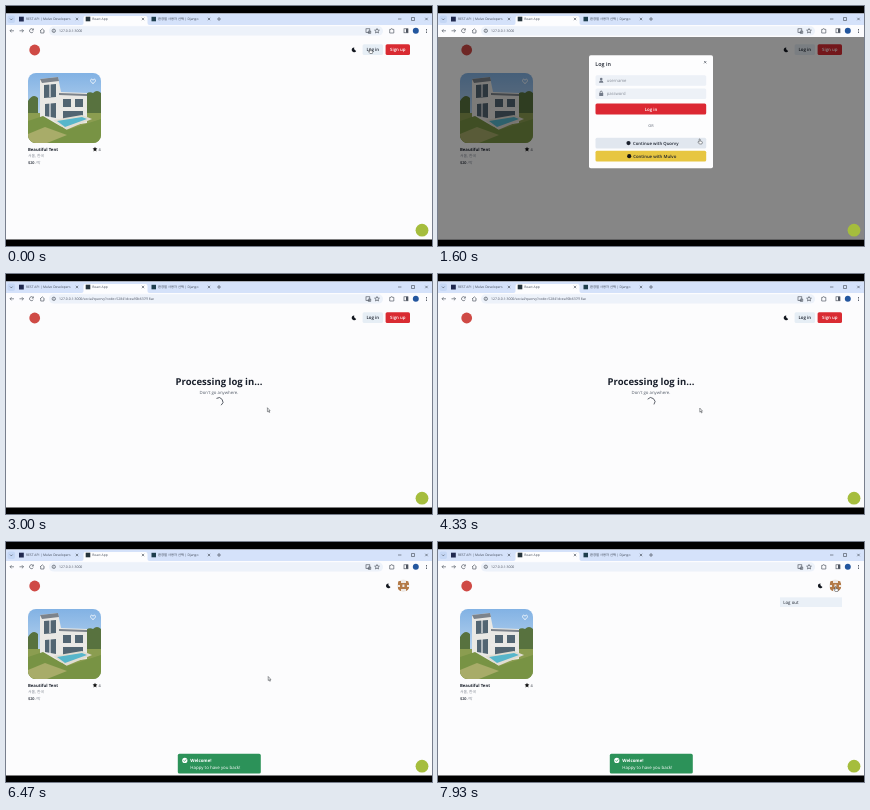
Write an HTML page that moves like this. It is 426 by 240 pixels and loops after 8000 ms.

```html
<!DOCTYPE html>
<html lang="en">
<head>
<meta charset="utf-8">
<title>Log in flow</title>
<style>
html, body { margin: 0; width: 100%; height: 100%; overflow: hidden; background: #000; }
svg { display: block; width: 100vw; height: 100vh; }
text { font: 4.4px "Open Sans", "Noto Sans CJK KR", "Noto Sans CJK", sans-serif; fill: #1a202c; text-rendering: geometricPrecision; }
.bold { font-weight: 700; }
.semi { font-weight: 600; }
.mid { text-anchor: middle; }
.white { fill: #fff; }
.soft { fill: #858b96; }
.small { font-size: 3.8px; }
.tab { font-size: 3.3px; fill: #424a58; }
.line { fill: none; stroke: #4b525e; stroke-width: .65; }
</style>
</head>
<body>
<svg viewBox="0 0 426 240" preserveAspectRatio="none">
  <defs>
    <clipPath id="photoClip"><rect x="22" y="67" width="73" height="70" rx="8"/></clipPath>
    <clipPath id="avatarClip"><circle cx="397.3" cy="43.7" r="6.2"/></clipPath>
    <clipPath id="pageClip"><rect y="31" width="426" height="202.5"/></clipPath>
    <linearGradient id="sky" x2="0" y2="1"><stop stop-color="#82b2e4"/><stop offset="1" stop-color="#dce9f4"/></linearGradient>
    <path id="close" class="line" d="M-1.2-1.2 1.2 1.2M1.2-1.2-1.2 1.2"/>
    <path id="moon" d="M.3-2.3A2.4 2.4 0 1 0 2.2 1.2 2.5 2.5 0 0 1 .3-2.3Z" fill="#141820"/>
  </defs>

  <!-- Browser window -->
  <rect y="7.5" width="426" height="226" fill="#fcfcfd"/>
  <rect y="7.5" width="426" height="11.5" fill="#d5e2fa"/>
  <rect x="1.5" y="9.5" width="7.5" height="7.5" rx="2" fill="#c5d7f5"/>
  <path class="line" d="m4 12.6 1.3 1.3 1.3-1.3"/>
  <rect x="13" y="10.7" width="4.8" height="4.8" fill="#20294f"/>
  <text class="tab" x="20" y="14.4">REST API | Mulvo Developers</text>
  <use href="#close" x="71" y="13"/>
  <path d="M75.5 19q2 0 2-2v-5q0-2 2-2h60q2 0 2 2v5q0 2 2 2Z" fill="#fdfdfe"/>
  <rect x="79.7" y="10.7" width="4.6" height="4.6" fill="#25333b"/>
  <text class="tab" x="86.3" y="14.4">React App</text>
  <use href="#close" x="137" y="13"/>
  <rect x="145.5" y="10.8" width="4.5" height="4.5" fill="#1d3d4c"/>
  <text class="tab" x="152" y="14.4">환경별 사용자 선택 | Django</text>
  <use href="#close" x="203" y="13"/>
  <path class="line" d="M211 13h4m-2-2v4M392 13h3.4M405.5 11.5h3v3h-3z"/>
  <use href="#close" x="420.5" y="13"/>
  <rect y="19" width="426" height="12" fill="#fcfcfe"/>
  <rect x="43" y="20.3" width="334" height="9.2" rx="4.6" fill="#edf2fa"/>
  <path class="line" d="M8 24.8H4m1.6-1.6L4 24.8l1.6 1.6M13.5 24.8h4m-1.6-1.6 1.6 1.6-1.6 1.6M27 23.4a2 2 0 1 0 .3 2.2M27.4 22.5v1.6h-1.6M34 25l2.3-2.2 2.3 2.2m-3.9-.5v2.5h3.2v-2.5"/>
  <g class="line">
    <circle cx="47.8" cy="24.8" r="1.7"/><path d="M47.8 24.5v1.2M47.8 23.4v.5"/>
    <rect x="360" y="22.8" width="3.8" height="3.8"/><path d="M362.3 25h2.4v2.4h-2.4z"/>
    <path d="m371 22.5.7 1.5 1.7.2-1.3 1.1.4 1.7-1.5-.9-1.5.9.4-1.7-1.3-1.1 1.7-.2z"/>
    <path d="M383.7 23.4h1.2a.8.8 0 0 1 1.6 0h1.3v3.6h-4.1z"/>
    <rect x="398" y="22.8" width="4" height="4"/>
  </g>
  <path d="M400 22.8h2v4h-2z" fill="#4b525e"/>
  <circle cx="409.8" cy="24.8" r="3" fill="#23569e"/>
  <path d="M420 23h.9v.9h-.9zM420 24.5h.9v.9h-.9zM420 26h.9v.9h-.9z" fill="#4b525e"/>
  <text id="url" x="53" y="26.1" style="font-size:3.45px;fill:#4a5160"></text>

  <!-- Page -->
  <circle cx="28.7" cy="44" r="5.4" fill="#cf4a45"/>
  <g id="guest">
    <use href="#moon" x="348" y="43.7"/>
    <rect x="356.6" y="38.2" width="20.4" height="10.8" rx="1.6" fill="#e6eef5"/>
    <text class="semi mid" x="366.8" y="45.3">Log in</text>
    <rect x="379.6" y="38.2" width="24.4" height="10.8" rx="1.6" fill="#d92b32"/>
    <text class="semi mid white" x="391.8" y="45.3">Sign up</text>
  </g>
  <g id="member">
    <use href="#moon" x="382.3" y="43.7"/>
    <g clip-path="url(#avatarClip)">
      <rect x="391" y="37" width="13" height="14" fill="#eee9e5"/>
      <path d="M392 39h3v2h5v-2h3v4h-2v2h2v4h-3v-2h-5v2h-3v-4h2v-2h-2zM396.4 42.5v2.4h2v-2.4z" fill="#b37a48" fill-rule="evenodd"/>
    </g>
  </g>

  <g id="home">
    <g clip-path="url(#photoClip)">
      <rect x="22" y="67" width="73" height="70" fill="url(#sky)"/>
      <path d="M22 95q5-8 10-3v20H22zM76 92q6-8 11-5 4-4 8 0v25H76z" fill="#58723f"/>
      <path d="M22 107h73v30H22z" fill="#8b9d50"/>
      <path d="m34 73 18-2 3 15 26 1v30l-27 4-20-9z" fill="#e9e8e4"/>
      <path d="m34 73 18-2 1 4-17 2zM53 87l28 1v2l-28-1z" fill="#7c838b"/>
      <path d="m38 79 12-1v13l-12 1zM39 98l11-1v15l-11-2zM57 93h8v8h-8zM69 93h8v8h-8zM57 105h20v10l-20 2z" fill="#526572"/>
      <path d="M44 78v13M44 97v14M53 103h28" stroke="#eee" stroke-width="1.2"/>
      <path d="m47 114 29-5 10 4-26 11z" fill="#e1ddd2"/>
      <path d="m51 115 25-4 5 2-22 8z" fill="#57b6cb"/>
      <path d="m22 115 15-5 24 14 34-11v24H22z" fill="#789344"/>
      <path d="m22 128 17-7 22 8-20 8H22z" fill="#a8ac69"/>
    </g>
    <path d="M87 77.6c-5-3.4-1-6 0-3.3 1-2.7 5-.1 0 3.3Z" fill="none" stroke="#fff" stroke-width=".8"/>
    <text class="bold" x="22" y="145" style="font-size:4.25px">Beautiful Tent</text>
    <path d="m89 140.8.7 1.5 1.7.2-1.3 1.2.4 1.7-1.5-.9-1.5.9.4-1.7-1.3-1.2 1.7-.2z" fill="#111"/>
    <text class="small" x="92.6" y="144.8">4</text>
    <text class="small soft" x="22" y="151.3">서울, 한국</text>
    <text class="small" x="22" y="158"><tspan class="semi">$20</tspan> <tspan class="soft">/박</tspan></text>
  </g>

  <g id="processing">
    <text class="bold mid" x="213" y="110.8" style="font-size:9.5px">Processing log in...</text>
    <text class="mid" x="213" y="119.8" style="fill:#535b68;font-size:4.3px">Don't go anywhere.</text>
    <path id="spinner" d="M-2.9-2.9A4.1 4.1 0 0 1 2.9 2.9" fill="none" stroke="#303640" stroke-width=".75"/>
  </g>

  <rect id="overlay" y="31" width="426" height="202.5" fill="#000"/>
  <g id="modal">
    <rect x="151" y="49.3" width="124" height="113" rx="1.8" fill="#fdfdfe"/>
    <text class="semi" x="157.3" y="60" style="font-size:5.4px">Log in</text>
    <use href="#close" x="267.2" y="56.2"/>
    <g fill="#edf1f7">
      <rect x="157.5" y="69.2" width="110.7" height="10.6" rx="1.5"/>
      <rect x="157.5" y="82.4" width="110.7" height="10.6" rx="1.5"/>
      <rect id="provider" x="157.5" y="131.8" width="110.7" height="10.6" rx="1.5"/>
    </g>
    <path d="M161 76.8q0-2.5 2.2-2.5t2.2 2.5zM161.2 86.9h4v3.2h-4z" fill="#737b89"/>
    <circle cx="163.2" cy="73" r="1.3" fill="#737b89"/>
    <path class="line" d="M162.1 87v-.8a1.1 1.1 0 0 1 2.2 0v.8"/>
    <text class="soft" x="168.7" y="76" style="font-size:4.2px">username</text>
    <text class="soft" x="168.7" y="89.2" style="font-size:4.2px">password</text>
    <rect x="157.5" y="97.5" width="110.7" height="11" rx="1.5" fill="#dc2833"/>
    <text class="semi mid white" x="213" y="104.7">Log in</text>
    <text class="semi mid soft small" x="213" y="121.4">OR</text>
    <circle cx="190.5" cy="137.1" r="2.1" fill="#1a202c"/>
    <text class="semi" x="195" y="138.8" style="font-size:4.3px">Continue with Quorvy</text>
    <rect x="157.5" y="144.8" width="110.7" height="10.8" rx="1.5" fill="#e7c641"/>
    <circle cx="191.2" cy="150.2" r="2.1" fill="#141414"/>
    <text class="semi" x="195.2" y="152" style="font-size:4.3px">Continue with Mulvo</text>
  </g>

  <g id="menu">
    <rect x="342" y="55.4" width="62" height="9.6" fill="#eaf0f7"/>
    <text x="345.2" y="61.8">Log out</text>
  </g>
  <g clip-path="url(#pageClip)">
    <g id="toast">
      <rect x="171.8" y="211.8" width="83" height="19.8" rx="1.6" fill="#2c9259"/>
      <circle cx="178.8" cy="218.4" r="2.6" fill="#fff"/>
      <path d="m177.5 218.4 1 1 1.7-2" fill="none" stroke="#2c9259" stroke-width=".8"/>
      <text class="bold white" x="184.3" y="220">Welcome!</text>
      <text class="white" x="184.3" y="226.9">Happy to have you back!</text>
    </g>
  </g>
  <circle cx="416" cy="224.2" r="6.4" fill="#a5bd3d"/>

  <g id="cursor" stroke="#20242b" stroke-width=".45" fill="#fff">
    <path id="arrow" d="M-.8-2V2L.1 1.2l.7 1.6.7-.3-.7-1.5h1.1z"/>
    <path id="hand" d="M-.8-2.4q.7-.6 1 .2V-.4l1.7.4q.6.2.4 1L1.8 2.5H-.6L-2 .7q0-.8.6-.5l.6.5z"/>
  </g>
</svg>
<script>
const LOOP = 8000;
const OPEN = 400, REDIRECT = 2400, WELCOME = 5700, MENU = 7450;
const cursorPath = [
  [0, 364.5, 45], [450, 364.5, 45], [930, 310.5, 81.5], [1040, 310.5, 81.5],
  [1500, 262, 135.5], [6500, 263, 136.5], [7250, 398, 47], [LOOP, 398, 47]
];
const $ = id => document.getElementById(id);
const clamp = x => Math.max(0, Math.min(1, x));
const easeOut = x => 1 - (1 - clamp(x)) ** 3;
const smooth = x => x * x * (3 - 2 * x);
const show = (id, on) => $(id).style.display = on ? "" : "none";

function scaleAbout(id, x, y, scale) {
  $(id).setAttribute("transform", `translate(${x} ${y}) scale(${scale}) translate(${-x} ${-y})`);
}

function cursorAt(t) {
  const i = cursorPath.findIndex(point => point[0] > t);
  const [t0, x0, y0] = cursorPath[i - 1], [t1, x1, y1] = cursorPath[i];
  const k = smooth((t - t0) / (t1 - t0));
  return [x0 + (x1 - x0) * k, y0 + (y1 - y0) * k];
}

function draw(t) {
  const processing = t >= REDIRECT && t < WELCOME;
  const member = t >= WELCOME;
  const modal = t >= OPEN && t < REDIRECT;
  show("home", !processing);
  show("processing", processing);
  show("guest", !member);
  show("member", member);
  show("overlay", modal);
  show("modal", modal);
  show("toast", member);
  show("menu", t >= MENU);
  $("url").textContent = "127.0.0.1:3000" + (processing ? "/social/quorvy?code=52841dcea90b637f18ac" : "");

  const opened = easeOut((t - OPEN) / 200);
  $("overlay").style.opacity = .47 * opened;
  $("modal").style.opacity = opened;
  scaleAbout("modal", 213, 106, .95 + .05 * opened);

  const [x, y] = cursorAt(t);
  const overProvider = modal && y > 132;
  $("provider").setAttribute("fill", overProvider ? "#e1e7ef" : "#edf1f7");
  $("spinner").setAttribute("transform", `translate(212.8 127.8) rotate(${10 + (t - 3000) * 360 / 450})`);

  const arrived = easeOut((t - WELCOME) / 400);
  $("toast").style.opacity = arrived;
  $("toast").setAttribute("transform", `translate(0 ${6.5 * (1 - arrived)})`);
  const unfolded = easeOut((t - MENU) / 200);
  $("menu").style.opacity = unfolded;
  scaleAbout("menu", 404, 55.4, .8 + .2 * unfolded);

  const hand = t < 550 || overProvider || t > 7180;
  show("hand", hand);
  show("arrow", !hand);
  $("cursor").setAttribute("transform", `translate(${x} ${y})`);
}

const start = performance.now();
function tick() {
  draw((performance.now() - start) % LOOP);
  requestAnimationFrame(tick);
}
tick();
</script>
</body>
</html>
```
